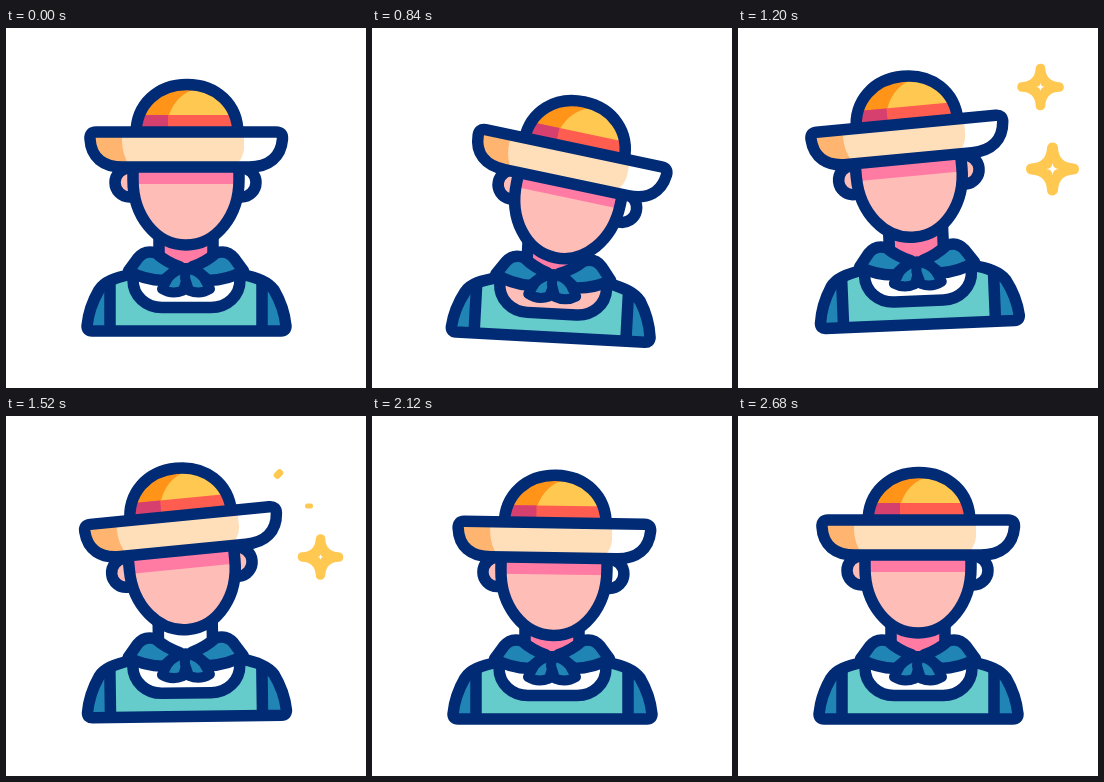
Write an HTML page that moves like this. It is 360x360 px and loops after 3 s.

```html
<!DOCTYPE html>
<html lang="en">
<head>
<meta charset="utf-8">
<title>Farmer</title>
<style>
  html, body { margin: 0; width: 100%; height: 100%; overflow: hidden; background: #fff; }
  svg { display: block; width: 100vw; height: 100vh; }
  .line { stroke: #022b75; stroke-width: 11.5; stroke-linecap: round; stroke-linejoin: round; }
  .thin { stroke-width: 10; }
  .open { fill: none; }
  .blue { fill: #2085b5; }
  .teal { fill: #66cbcb; }
  .skin { fill: #ffbdb8; }
  .pink { fill: #ff7ba3; }
  .white { fill: #fff; }
  .gold { fill: #ffc850; }
  .star { stroke: #ffc850; stroke-width: 11; stroke-linejoin: round; }
</style>
</head>
<body>
<svg viewBox="0 0 360 360">
  <defs>
    <path id="torso" d="M126 246C108 250 98 254 93 262C86 274 82 288 81 298Q81 303 86 303H275Q280 303 280 298C279 288 275 274 268 262C262 254 252 250 235 246Z"/>
    <path id="collar" d="M127 246V252C127 268 140 279.500 156 279.500H205C221 279.500 234 268 234 252V246Z"/>
    <path id="face" d="M127 136V152C127 188 150 217 180 217S233 188 233 152V136Z"/>
    <path id="crown" d="M130 106C130 76 152 56.500 181 56.500S232 76 232 106Z"/>
    <path id="brim" d="M90 104H270Q277 104 276.500 111C275 129 263 139 243 139H117C97 139 85 129 84 111Q83.500 104 90 104Z"/>
    <path id="spark" d="M0-21Q1-1 21 0Q1 1 0 21Q-1 1-21 0Q-1-1 0-21Z"/>
    <g id="scarfHalf">
      <path class="line blue" d="M122.500 243L132 230Q139 221.500 150 225Q160 234 174 239L158 252.500Q138 252 122.500 243Z"/>
      <path class="line thin blue" d="M180 240Q168 242 162 250L156 261Q166 267 177 262.500L181 250Z"/>
    </g>
    <clipPath id="torsoClip"><use href="#torso"/></clipPath>
    <clipPath id="collarClip"><use href="#collar"/></clipPath>
    <clipPath id="faceClip"><use href="#face"/></clipPath>
    <clipPath id="crownClip"><use href="#crown"/></clipPath>
    <clipPath id="brimClip"><use href="#brim"/></clipPath>
  </defs>

  <g id="body">
    <use href="#torso" class="teal"/>
    <g clip-path="url(#torsoClip)">
      <path class="blue" d="M70 240H104V310H70ZM256 240H290V310H256Z"/>
    </g>
    <path class="line open" d="M104 254V302M256 254V302"/>
    <use href="#torso" class="line open"/>
    <use href="#collar" class="white"/>
    <g clip-path="url(#collarClip)"><rect id="chest" class="skin" y="240" height="45"/></g>
    <use href="#collar" class="line open"/>

    <path id="neck" class="pink" d="M153 195H207V225L180 242L153 225Z"/>
    <path class="line open" d="M153 200V225M207 200V225"/>
    <use href="#scarfHalf"/>
    <use href="#scarfHalf" transform="matrix(-1 0 0 1 360 0)"/>

    <g id="head">
      <circle class="line skin" cx="123.500" cy="154.500" r="14.500"/>
      <circle id="ear" class="line white" cx="235.500" cy="154.500" r="14.500"/>
      <use href="#face" class="skin"/>
      <g clip-path="url(#faceClip)"><rect class="pink" x="120" y="136" width="120" height="20"/></g>
      <use href="#face" class="line open"/>

      <g id="hat">
        <g clip-path="url(#crownClip)">
          <rect class="gold" x="120" y="50" width="120" height="60"/>
          <path fill="#ff9418" d="M120 50H200L192 60Q169 66 162 90H120Z"/>
          <rect fill="#ff5d50" x="120" y="87" width="120" height="20"/>
          <rect fill="#d6406f" x="120" y="87" width="42" height="20"/>
        </g>
        <use href="#crown" class="line open"/>

        <use href="#brim" class="white"/>
        <g clip-path="url(#brimClip)">
          <path fill="#ffdfba" d="M80 100H238V121Q237 133 226 140H80Z"/>
          <path fill="#ffb56f" d="M80 100H116V112Q116 128 125 140H80Z"/>
        </g>
        <use href="#brim" class="line open"/>
      </g>
    </g>
  </g>

  <g id="starA"><use href="#spark" class="gold star"/><use href="#spark" class="white"/></g>
  <g id="starB"><use href="#spark" class="gold star"/><use href="#spark" class="white"/></g>
  <g id="bits" class="gold">
    <rect x="267.500" y="54.500" width="10" height="7" rx="3" transform="rotate(-45 272.500 58)"/>
    <rect x="299" y="87.500" width="8" height="5" rx="2.500"/>
  </g>
</svg>
<script>
const LOOP = 3000, STEP = 40;
const $ = id => document.getElementById(id);

// time, body angle, body y, head angle, head x, head y
const POSES = [
  [200, 0, 0, 0, 0, 0],
  [520, 2.8, 4.8, 3.3, 1, 2],
  [720, 3.2, 6.2, 8, 0, 4.8],
  [840, 3.1, 6.2, 8.8, -0.5, 6.2],
  [1200, -2.4, -6.5, -3, -0.3, -1.5],
  [1320, -2, -5.8, -4.6, 1, -1.8],
  [1520, -0.8, -2.5, -4.8, 3.8, -1],
  [1880, 0, 0.3, 0.4, 0.6, 0.5],
  [2000, 0.1, 0.4, 1.7, 1, 2],
  [2120, 0, 0, 0.9, 0.8, 2.5],
  [2400, 0, 0, 0.1, 0, 0.3],
  [2680, 0, 0, 0, 0, 0]
];

const clamp = x => Math.min(1, Math.max(0, x));
const ramp = (t, a, b) => {
  const u = clamp((t - a) / (b - a));
  return u * u * (3 - 2 * u);
};
const within = (t, a, b) => t >= a && t < b;

function slope(i, k) {
  const a = POSES[i - 1], b = POSES[i + 1];
  return a && b ? (b[k] - a[k]) / (b[0] - a[0]) : 0;
}

// Cubic Hermite through the pose table
function poseAt(t) {
  const last = POSES.length - 1;
  t = Math.min(Math.max(t, POSES[0][0]), POSES[last][0]);
  let i = 0;
  while (i < last - 1 && t > POSES[i + 1][0]) i++;
  const p = POSES[i], q = POSES[i + 1], d = q[0] - p[0], u = (t - p[0]) / d;
  return p.map((v, k) =>
    v + (q[k] - v) * u * u * (3 - 2 * u) +
    d * u * (1 - u) * (slope(i, k) * (1 - u) - slope(i + 1, k) * u));
}

function place(id, x, y, scale, hole, shown) {
  const el = $(id);
  el.setAttribute('visibility', shown && scale > 0.02 ? 'visible' : 'hidden');
  el.setAttribute('transform', `translate(${x} ${y}) scale(${scale})`);
  el.lastElementChild.setAttribute('transform', `scale(${hole})`);
}

function draw(t) {
  const [, turn, drop, tilt, hx, hy] = poseAt(t);
  $('body').setAttribute('transform', `translate(0 ${drop}) rotate(${turn} 180 265)`);
  $('head').setAttribute('transform', `translate(${hx} ${hy}) rotate(${tilt} 180 225)`);
  // The hat slides a little against the tilt
  $('hat').setAttribute('transform', `translate(${-0.5 * tilt} ${0.25 * tilt})`);

  const w = t < 1000 ? 110 * ramp(t, 460, 640) : 0;
  $('chest').setAttribute('x', 176 - w / 2);
  $('chest').setAttribute('width', w);
  $('neck').setAttribute('class', within(t, 1400, 1760) ? 'white' : 'pink');
  $('ear').setAttribute('class', within(t, 1040, 1760) ? 'line skin' : 'line white');

  place('starA', 302.5, 59, 0.88 * ramp(t, 980, 1180),
    0.24 + 1.25 * ramp(t, 1220, 1480), t < 1480);
  place('starB', 314.5, 141, ramp(t, 1020, 1200) * (1 - 0.14 * ramp(t, 1360, 1520)) * (1 - ramp(t, 1520, 1760)),
    0.3 - 0.15 * ramp(t, 1360, 1520), true);
  $('bits').setAttribute('visibility', within(t, 1480, 1600) ? 'visible' : 'hidden');
}

const start = performance.now();
function tick() {
  const t = (performance.now() - start) % LOOP;
  draw(Math.floor(t / STEP) * STEP);
  requestAnimationFrame(tick);
}
tick();
</script>
</body>
</html>
```
